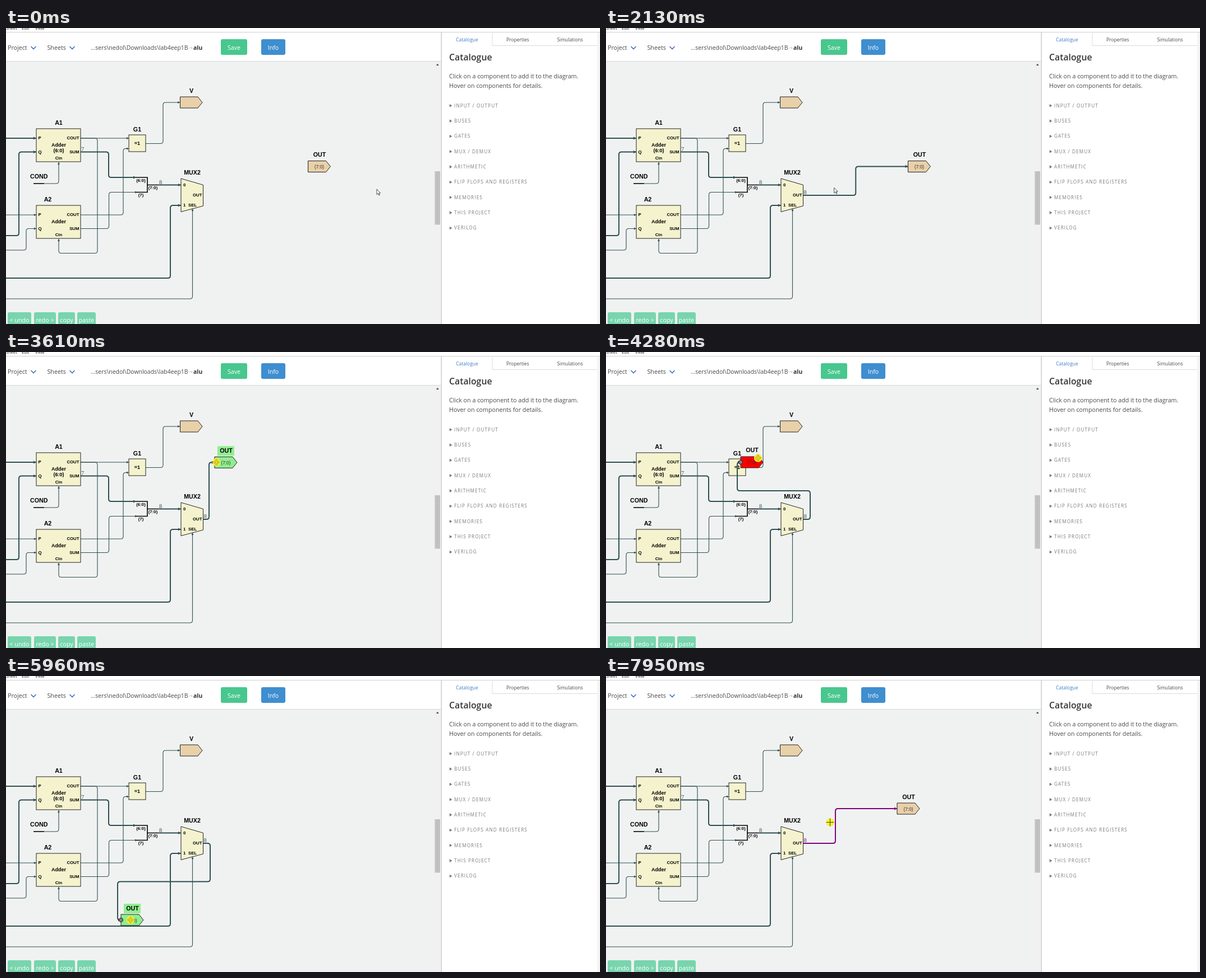
These frames come from a looping animation (1059x529 px, 8000 ms). An HTML page:

```html
<!DOCTYPE html>
<html lang="en">
<head>
<meta charset="utf-8">
<title>Schematic editor</title>
<style>
html, body { margin: 0; width: 100%; height: 100%; overflow: hidden; background: #fff; }
svg { display: block; width: 1059px; height: 529px; }
text { font-family: "Open Sans", "Noto Sans", sans-serif; font-size: 10.7px; fill: #4a4a4a; white-space: pre; }
.mid { text-anchor: middle; }
.end { text-anchor: end; }
.menu { font-size: 7.6px; fill: #222; }
.tab { font-size: 8.45px; text-anchor: middle; }
.item { font-size: 8.2px; letter-spacing: 1.1px; fill: #7a7a7a; }
.btn { fill: #fff; text-anchor: middle; }
.title { font-size: 15.8px; font-weight: 600; fill: #363636; }
.folder { font-size: 10.45px; }
.file { font-size: 10.4px; font-weight: 700; fill: #363636; }
.active { fill: #3e7cc4; }
.name, .port, .type, .small { font-family: "Liberation Sans", Arial, sans-serif; font-weight: 700; fill: #000; }
.name { font-size: 10.7px; text-anchor: middle; }
.type { font-size: 9px; text-anchor: middle; }
.port { font-size: 7.8px; }
.small { font-size: 8.3px; font-weight: 400; fill: #333; text-anchor: middle; }
.bits { font-family: "Liberation Serif", Times, serif; font-size: 10.5px; fill: #2f4f4f; }
.wire { fill: none; stroke: #2f4f4f; stroke-width: 1.1; }
.bus { stroke-width: 2; }
.tip { fill: #2f4f4f; }
.bar { fill: none; stroke: #000; stroke-width: 1.6; }
.part { fill: #f5f3ce; stroke: #222; stroke-width: 1; }
.pin { fill: #e8d0a9; stroke: #222; stroke-width: 1; }
.dot { fill: #808080; stroke: #222; stroke-width: 1; }
</style>
</head>
<body>
<svg viewBox="0 0 1059 529">
  <rect width="1059" height="529" fill="#fff"/>
  <rect y="60" width="776" height="469" fill="#f0f2f2"/>
  <g id="sheet"></g>
  <g id="net">
    <path id="netLine" class="wire bus"/>
    <path id="netTip" class="tip"/>
    <text id="netBits" class="bits" x="352.5" y="297">8</text>
  </g>
  <g id="out">
    <rect id="glow" x="5" y="-29" width="30" height="17" fill="#90ee90"/>
    <path id="outBody" class="pin" d="M0-10H32L40 0L32 10H0Z"/>
    <text class="name" x="20.5" y="-17.5">OUT</text>
    <text class="small" x="20" y="3.5">(7:0)</text>
  </g>
  <circle id="outDot" class="dot" r="3.6"/>
  <g id="link">
    <g id="sources"></g>
    <line id="band" x1="538.5" y1="247.5" stroke="#0a6a0a" stroke-width="1.5" stroke-dasharray="4 3"/>
    <circle id="bandEnd" r="4" fill="#0a6a0a"/>
  </g>
  <g id="chrome"></g>
  <g id="cursor">
    <circle id="disc" r="7.2" fill="#f8f032"/>
    <path id="arrow" d="M0 0V9.6L2.3 7.5L3.9 11L5.3 10.4L3.8 7H6.6Z" fill="#fff" stroke="#222" stroke-width=".8"/>
    <g id="move" fill="none" stroke="#8d7d1c" stroke-width=".9"></g>
    <path id="cross" d="M-7 0H7M0-7V7" stroke="#4a4a18"/>
  </g>
</svg>
<script>
const $ = id => document.getElementById(id);
const text = (cls, x, y, s) => `<text class="${cls}" x="${x}" y="${y}">${s}</text>`;
const rect = (x, y, w, h, attrs) => `<rect x="${x}" y="${y}" width="${w}" height="${h}" ${attrs}/>`;
const dot = (x, y) => `<circle class="dot" cx="${x}" cy="${y}" r="3.6"/>`;

// Path from x, y that turns alternately to a new x and a new y
function route(x, y, ...turns) {
  const pts = [[x, y]];
  turns.forEach((v, i) => {
    const [px, py] = pts[i];
    pts.push(i % 2 ? [px, v] : [v, py]);
  });
  return pts;
}

function rounded(pts, radius = 4.5) {
  let d = "M" + pts[0];
  for (let i = 1; i < pts.length - 1; i++) {
    const [x, y] = pts[i];
    const toward = ([px, py]) => {
      const len = Math.hypot(px - x, py - y) || 1;
      const r = Math.min(radius, len / 2);
      return [x + (px - x) / len * r, y + (py - y) / len * r];
    };
    d += `L${toward(pts[i - 1])}Q${x},${y} ${toward(pts[i + 1])}`;
  }
  return d + "L" + pts[pts.length - 1];
}

const tipPath = ([x, y], up, size) =>
  up ? `M${x},${y}l${-size / 2},${size}h${size}Z` : `M${x},${y}l${-size},${-size / 2}v${size}Z`;

function line(cls, size, turns) {
  const pts = route(...turns), up = turns.length % 2 === 0;
  return `<path class="${cls}" d="${rounded(pts)}"/><path class="tip" d="${tipPath(pts[pts.length - 1], up, size)}"/>`;
}
const wire = (...turns) => line("wire", 4, turns);
const bus = (...turns) => line("wire bus", 5, turns);

function adder(y, name, nameX, bits = "") {
  const row = (dy, left, right) => text("port", 57.5, y + dy, left) + text("port end", 130.5, y + dy, right);
  return rect(54, y, 79, 59, 'class="part"') + text("name", nameX, y - 7.5, name) +
    row(19.2, "P", "COUT") + row(44, "Q", "SUM") + text("port mid", 94, y + 55, "Cin") +
    text("type", 94, y + 31.5, "Adder") + text("type", 94, y + 42, bits);
}

$("sheet").innerHTML =
  bus(0, 197, 54) + bus(0, 371, 23, 221.5, 54) + wire(0, 334, 54) + wire(0, 397, 36, 358.5, 54) +
  wire(68, 278, 94, 240) + wire(133, 197, 219) + wire(133, 197, 163, 402.5, 94, 377) +
  bus(133, 221.5, 183, 267, 232) + wire(133, 334, 209, 215.5, 219) + wire(133, 358.5, 183.5, 293.5, 234) +
  wire(249, 206.5, 280, 133, 310) + bus(271, 280.5, 312) + bus(0, 447, 293, 317, 312) + wire(0, 484, 332.5, 323) +
  '<path class="bar" d="M232 267H252V293.5H232M252 280.5H271"/><path class="bar bus" d="M49 278H68"/>' +
  adder(180, "A1", 94, "(6:0)") + adder(317, "A2", 74.5) +
  rect(219, 191, 30, 30, 'class="part"') + text("type", 234, 209, "=1") + text("name", 234, 184.5, "G1") +
  '<path class="part" d="M312 269L351.5 280.5V318L312 328.5Z"/>' + text("name", 332, 262, "MUX2") +
  text("port", 316, 283, "0") + text("port", 316, 319.2, "1") +
  text("port", 325, 319.2, "SEL") + text("port end", 349.5, 301, "OUT") +
  '<path class="pin" d="M310.5 123H342L350 133L342 143H310.5Z"/>' + text("name", 330.5, 115.5, "V") +
  text("name", 58.8, 268.5, "COND") + text("port mid", 240.5, 274.5, "(6:0)") +
  text("port mid", 262, 287.5, "(7:0)") + text("port mid", 240.5, 300.5, "(7)") +
  text("bits", 134, 220, "7") + text("bits", 273, 278.5, "8");

$("sources").innerHTML = [197, 221.5, 334, 358.5].map(y => dot(133, y)).join("") +
  dot(69, 278) + dot(272, 280.5) + dot(249, 206.5) + dot(352, 299);

$("move").innerHTML = [0, 90, 180, 270]
  .map(a => `<path d="M-2-3.4L0-5.6L2-3.4L0-1.4Z" transform="rotate(${a})"/>`).join("");

const groups = ["INPUT / OUTPUT", "BUSES", "GATES", "MUX / DEMUX", "ARITHMETIC",
  "FLIP FLOPS AND REGISTERS", "MEMORIES", "THIS PROJECT", "VERILOG"];
const chevron = x => `<path d="M${x - 4.5} 33l4.5 4.5l4.5-4.5" fill="none" stroke="#3e6fc0" stroke-width="1.6"/>`;
const button = (x, y, w, h, fill, s) =>
  rect(x, y, w, h, `rx="3" fill="${fill}"`) + text("btn", x + w / 2, y + h / 2 + 4.5, s);
const edit = (x, w, s) => button(x, 508, w, 26, "#78d5ad", s);

$("chrome").innerHTML =
  rect(0, 0, 1059, 8, 'fill="#fff"') + rect(0, 7, 1059, 1, 'fill="#cfcfcf"') +
  text("menu", 0, 3.4, "Sheet") + text("menu", 28, 3.4, "Edit") + text("menu", 52, 3.4, "View") +
  rect(0, 59, 776, 1, 'fill="#d3d6d8"') +
  text("", 3, 38.5, "Project") + chevron(49) + text("", 73.5, 38.5, "Sheets") + chevron(118) +
  text("folder", 151, 38.5, "...sers\\nedol\\Downloads\\lab4eep1B") +
  '<path d="M326 35.5H332M330.5 34L332 35.5L330.5 37" fill="none" stroke="#bbb" stroke-width=".8"/>' +
  text("file", 334, 38.5, "alu") +
  button(383, 20, 47, 28, "#48c78e", "Save") + button(455, 20, 43, 28, "#3e8ed0", "Info") +
  edit(3, 42, "&lt; undo") + edit(50, 39, "redo &gt;") + edit(93, 30, "copy") + edit(127, 33, "paste") +
  rect(764, 60, 11, 469, 'fill="#f1f1f1"') + rect(764.5, 256, 9.5, 95.5, 'fill="#c1c1c1"') +
  '<path d="M766.8 67L769.3 64L771.8 67Z" fill="#444"/>' +
  rect(775, 8, 284, 521, 'fill="#fff"') + rect(775.5, 8, 1.5, 521, 'fill="#c9cccd"') +
  rect(1054, 8, 5, 521, 'fill="#f4f4f4"') +
  rect(867, 31, 187, 1, 'fill="#dbdbdb"') + rect(866.5, 9, 1, 22, 'fill="#dbdbdb"') +
  text("tab active", 822, 23.5, "Catalogue") + text("tab", 912.3, 23.5, "Properties") +
  text("tab", 1005.5, 23.5, "Simulations") + text("title", 790, 58, "Catalogue") +
  text("", 790, 90, "Click on a component to add it to the diagram.") +
  text("", 790, 107, "Hover on components for details.") +
  groups.map((s, i) => {
    const y = 138.8 + 27.33 * i;
    return `<path d="M790.8 ${y - 2.8}l4.6 2.8l-4.6 2.8Z" fill="#777"/>` + text("item", 799, y + 3, s);
  }).join("");

// Pointer: time, x, y
const path = [
  [194, 661, 288], [920, 540, 247.5], [1053, 540, 247.5], [1195, 521, 253.5], [1262, 502, 256],
  [1660, 353, 299], [1925, 353, 299], [2700, 555.5, 247.5], [2850, 555.5, 247.5], [2932, 549.5, 240],
  [2999, 541, 225.5], [3540, 387, 197], [4201, 257, 197], [4268, 271, 189.5], [4650, 450, 180],
  [4950, 580, 320], [5136, 525, 395.5], [5203, 494, 407], [5700, 222, 436], [6000, 222, 436],
  [6539, 539.5, 247], [6606, 540, 242], [6760, 536, 237], [6894, 536, 237],
  [7420, 436, 268], [7683, 436, 268], [7875, 409, 264], [7942, 399.5, 261.5]];

// The picture refreshes every STEP ms; dragged things follow the pointer one step late
const START = 260, STEP = 66.8, GRAB = 17;
const stepTime = t => Math.max(0, START + STEP * Math.floor((t - START) / STEP + 0.06));
const blocks = [...document.querySelectorAll("#sheet .part, #sheet .pin")].map(el => el.getBBox());

function pointer(t) {
  const i = path.findIndex(k => k[0] > t);
  if (i === 0) return path[0].slice(1);
  if (i < 0) return path[path.length - 1].slice(1);
  const [t0, x0, y0] = path[i - 1], [t1, x1, y1] = path[i], f = (t - t0) / (t1 - t0);
  return [x0 + (x1 - x0) * f, y0 + (y1 - y0) * f];
}

function set(id, attrs) {
  for (const k in attrs) $(id).setAttribute(k, attrs[k]);
}
const show = (id, on) => set(id, { display: on ? "inline" : "none" });

function draw(now) {
  const clock = now % 8000, t = stepTime(clock);
  const [cx, cy] = pointer(t), [lx, ly] = pointer(t - STEP);
  const linking = clock >= 1120 && clock < 1990;
  const dragging = clock >= 2800 && clock < 6960;
  const bending = clock >= 7750;

  // Output pin
  const [x, y] = clock < 2800 ? [538.5, 247.5] : dragging ? [lx - GRAB, ly] : [519, 237];
  const clash = dragging && blocks.some(b =>
    x < b.x + b.width && x + 40 > b.x && y - 10 < b.y + b.height && y + 10 > b.y);
  const chosen = clock >= 2800 && !bending;
  set("out", { transform: `translate(${x},${y})` });
  $("outBody").style.fill = clash ? "#f00" : chosen ? "#90ee90" : "#e8d0a9";
  show("glow", chosen && !clash);
  set("outDot", { cx: x, cy: y });
  show("outDot", !linking && Math.hypot(cx - x, cy - y) < 45);

  // Its wire
  const sx = 352, sy = 299;
  const pts = x > 370
    ? route(sx, sy, bending ? lx : (sx + x) / 2, y, x)
    : route(sx, sy, sx + 12, (sy + y) / 2, x - 6, y, x);
  show("net", clock >= 1990);
  set("netLine", { d: rounded(pts) });
  set("netTip", { d: tipPath([x, y], false, 5) });
  $("netLine").style.stroke = $("netTip").style.fill = $("netBits").style.fill = bending ? "#800080" : "#2f4f4f";

  // New connection
  show("link", linking);
  set("band", { x2: lx, y2: ly });
  set("bandEnd", { cx: lx, cy: ly });

  // Pointer
  const cross = clock >= 7420, move = linking || dragging;
  set("cursor", { transform: `translate(${cx},${cy})` });
  show("disc", move || bending);
  show("move", move);
  show("cross", cross);
  show("arrow", !move && !cross);
}

function loop() {
  draw(performance.now());
  requestAnimationFrame(loop);
}
loop();
</script>
</body>
</html>
```
